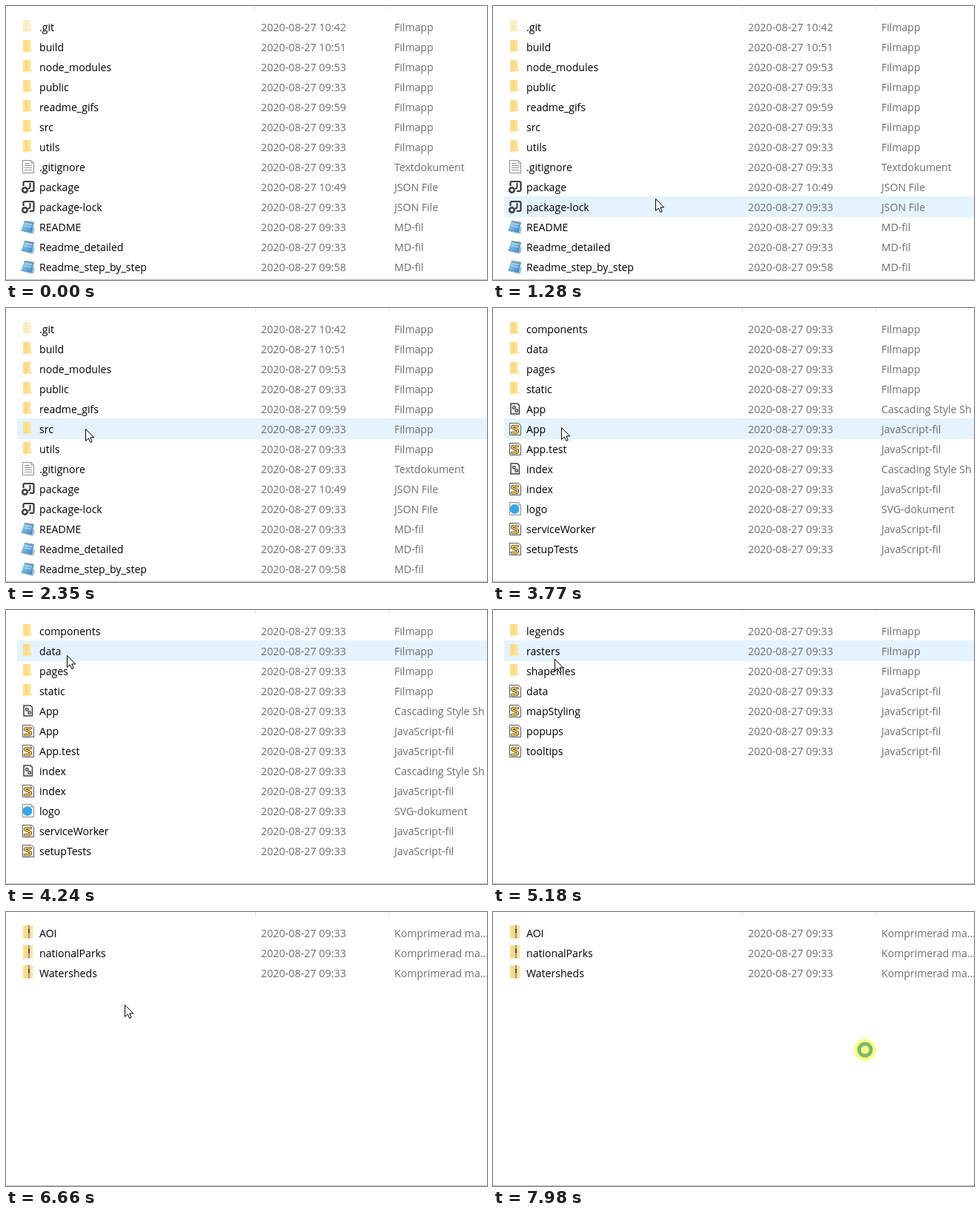
Recreate the animation shown at these times as an HTML page. Size 649 by 370 pixels, loop 8000 ms.

```html
<!DOCTYPE html>
<html lang="sv">
<head>
<meta charset="utf-8">
<title>File browser</title>
<style>
  html, body { margin: 0; width: 649px; height: 370px; overflow: hidden; background: #fff; }
  svg { display: block; }
  text { font: 14.1px "Open Sans", "Noto Sans", sans-serif; fill: #000; white-space: pre; }
  .date, .type { fill: #6d6d6d; }
  .date { font-size: 14.3px; }
</style>
</head>
<body>
<svg id="stage" width="649" height="370" viewBox="0 0 649 370">
  <defs>
    <linearGradient id="gold"><stop offset="0" stop-color="#f6d274"/><stop offset="1" stop-color="#ffe9a6"/></linearGradient>
    <linearGradient id="sky" x2="1" y2="1"><stop offset="0" stop-color="#a9dcf5"/><stop offset="1" stop-color="#2f7fbd"/></linearGradient>
    <g id="folder">
      <path d="M23.500 5H33.500V17L35 18V20.500H23.500Z" fill="url(#gold)"/>
      <path d="M23 5L26 7.500V22.500L23 20.500Z" fill="#fbdf90"/>
    </g>
    <g id="faded"><use href="#folder" opacity=".5"/></g>
    <g id="page">
      <path d="M22.500 5.500H34L37.500 9V22.500H22.500Z" fill="#fff" stroke="#8b8b8b"/>
      <path d="M34 5.500V9H37.500" fill="none" stroke="#8b8b8b"/>
    </g>
    <g id="text">
      <use href="#page"/>
      <path d="M25 9.500H32M25 12.500H35M25 15.500H35M25 18.500H35" stroke="#8d939b"/>
    </g>
    <g id="json" fill="none" stroke="#37363b">
      <path d="M23.500 13V9Q23.500 7 25.500 7H35.500Q37.500 7 37.500 9V18Q37.500 20 35.500 20H32" stroke-width="2.200"/>
      <path d="M32.500 9V14Q32.500 16.500 30 16.500" stroke-width="2"/>
      <circle cx="25.500" cy="18.500" r="3.200" stroke-width="2.200"/>
      <circle cx="25.500" cy="18.500" r="4.400" stroke-width="1" stroke-dasharray="1.700 1.700"/>
    </g>
    <g id="note">
      <path d="M25 6L38 8 35 22 20.500 19Z" fill="url(#sky)"/>
      <path d="M25 6L38 8 37.600 9.500 24.500 7.500Z" fill="#7b8c99"/>
      <path d="M20.500 19L35 22 38 15 37 22.500 34 23Z" fill="#dbe9f2" stroke="#56809f" stroke-width=".6"/>
      <path d="M26 10L35 11.500M25 13L34 14.500" stroke="#d6f0fb" stroke-width=".8"/>
    </g>
    <g id="script">
      <path d="M22.500 6.500H34.500L37.500 9.500V22.500H22.500Z" fill="#fff" stroke="#555"/>
      <g fill="none" stroke-linecap="round">
        <path id="scroll" d="M33.500 10.500H28Q25 10.500 26 13L33 16Q34 19.500 31 19.500H25.500" stroke="#5a4a22" stroke-width="3.600"/>
        <path d="M33.500 10.500H28Q25 10.500 26 13L33 16Q34 19.500 31 19.500H25.500" stroke="#f0c75c" stroke-width="1.900"/>
      </g>
    </g>
    <g id="style">
      <path d="M24 7H33L35.500 9.500V21H24Z" fill="#fff" stroke="#404040" stroke-width="1.500"/>
      <circle cx="28.300" cy="12.200" r="1.900" fill="#bbb" stroke="#555" stroke-width="1.300"/>
      <circle cx="31.700" cy="16.500" r="1.900" fill="#bbb" stroke="#555" stroke-width="1.300"/>
    </g>
    <g id="vector">
      <use href="#page"/>
      <circle cx="29" cy="14.500" r="6.500" fill="#37a6e6"/>
    </g>
    <g id="zip">
      <path d="M23 4H36.500V21.500H23Z" fill="url(#gold)"/>
      <path d="M23 4L25.500 6V22.500L23 21Z" fill="#fbdf90"/>
      <path d="M31 4V22" stroke="#e6dcc0" stroke-width="3.500"/>
      <path d="M31 4V22" stroke="#6b6147" stroke-width="2.200" stroke-dasharray="1 1"/>
      <path d="M31 9V14" stroke="#55503f" stroke-width="2"/>
    </g>
  </defs>
  <rect id="bar" x="15" width="640" height="28"/>
  <path d="M336.500 0V6M516.500 0V6" stroke="#e2e2e2"/>
  <path d="M0 369.500H649" stroke="#bdbdbd"/>
  <g id="lists"></g>
  <path id="arrow" d="M.5.5V16.500L4.300 13 6.800 18.500 9.200 17.500 6.800 12H11.700Z" fill="#fff" stroke="#000"/>
  <circle id="busy" r="8" fill="#fff" stroke="#0078d7" stroke-width="5"/>
  <circle id="press" r="15" fill="#ff0" fill-opacity=".47"/>
</svg>
<script>
const LOOP = 8000, ROW = 27, TOP = 14;
const $ = id => document.getElementById(id);

const TYPES = {
  folder: 'Filmapp', faded: 'Filmapp', text: 'Textdokument', json: 'JSON File', note: 'MD-fil',
  script: 'JavaScript-fil', style: 'Cascading Style Sh', vector: 'SVG-dokument', zip: 'Komprimerad ma...'
};

// Each entry: icon, name and, unless 09:33, the time.
const views = [
  { from: 0, files: `faded .git 10:42|folder build 10:51|folder node_modules 09:53|folder public|
    folder readme_gifs 09:59|folder src|folder utils|text .gitignore|json package 10:49|
    json package-lock|note README|note Readme_detailed|note Readme_step_by_step 09:58` },
  { from: 3370, files: `folder components|folder data|folder pages|folder static|style App|script App|
    script App.test|style index|script index|vector logo|script serviceWorker|script setupTests` },
  { from: 4790, files: `folder legends|folder rasters|folder shapefiles|script data|script mapStyling|
    script popups|script tooltips` },
  { from: 6110, files: 'zip AOI|zip nationalParks|zip Watersheds' }
];

function fileRow(entry, i) {
  const [icon, name, time = '09:33'] = entry.trim().split(' ');
  return `<g transform="translate(0 ${TOP + ROW * i})"><use href="#${icon}"/>
    <text x="45" y="20">${name}</text>
    <text class="date" x="344" y="20">2020-08-27 ${time}</text>
    <text class="type" x="524" y="20">${TYPES[icon]}</text></g>`;
}

for (const view of views) {
  const rows = view.files.split('|');
  view.count = rows.length;
  $('lists').insertAdjacentHTML('beforeend', `<g>${rows.map(fileRow).join('')}</g>`);
  view.node = $('lists').lastElementChild;
}

// Pointer keys: time, x, y, number of jumps from the key before.
const keys = [
  [880, 266, 354, 1], [1280, 219, 260, 5], [1660, 155, 197, 5],
  [1750, 143, 190, 1], [2120, 107, 163, 5],
  [2820, 103, 163, 1], [2990, 93, 163, 2],
  [3770, 92, 161, 1], [4240, 82, 61, 6], [4560, 82, 58, 4],
  [5180, 83, 66, 1], [5340, 88, 139, 2], [5500, 90, 83, 2],
  [6510, 97, 84, 1],
  [6660, 160, 125, 1], [6740, 330, 226, 1], [6890, 600, 183, 2],
  [7980, 502, 186, 1]
];
const presses = [[2290, 2350], [3140, 3220], [3290, 3370], [4630, 4710], [5880, 5960], [6030, 6110], [7900, LOOP]];
const selections = [[2440, 3370], [4630, 4790], [5880, 6110]];
const BUSY = 7980;

const stops = keys.flatMap(([t, x, y, n], i) => {
  const [pt, px, py] = keys[i - 1] || [t, x, y];
  return Array.from({ length: n }, (_, k) => {
    const f = (k + 1) / n;
    const mix = (a, b) => Math.round(a + (b - a) * f);
    return { t: mix(pt, t), x: mix(px, x), y: mix(py, y) };
  });
});

const during = (spans, t) => spans.some(([a, b]) => t >= a && t < b);
const show = (node, on) => node.setAttribute('visibility', on ? 'visible' : 'hidden');

function draw(t) {
  const view = views.findLast(v => t >= v.from);
  for (const v of views) v.node.style.display = v === view ? '' : 'none';

  const at = stops.findLast(s => t >= s.t);
  const row = at ? Math.floor((at.y - TOP) / ROW) : -1;
  const selected = during(selections, t);
  const bar = $('bar');
  show(bar, row >= 0 && row < view.count);
  bar.setAttribute('x', selected ? 15.5 : 15);
  bar.setAttribute('y', TOP + ROW * row + (selected ? 0.5 : 0));
  bar.setAttribute('height', selected ? 27 : 28);
  bar.setAttribute('fill', selected ? '#cce8ff' : '#e5f3ff');
  bar.setAttribute('stroke', selected ? '#99d1ff' : 'none');

  show($('arrow'), at && t < BUSY);
  show($('busy'), t >= BUSY);
  show($('press'), during(presses, t));
  if (at) {
    for (const id of ['arrow', 'busy', 'press']) $(id).setAttribute('transform', `translate(${at.x} ${at.y})`);
  }
}

const start = performance.now();
function tick() {
  draw((performance.now() - start) % LOOP);
  requestAnimationFrame(tick);
}
tick();
</script>
</body>
</html>
```
